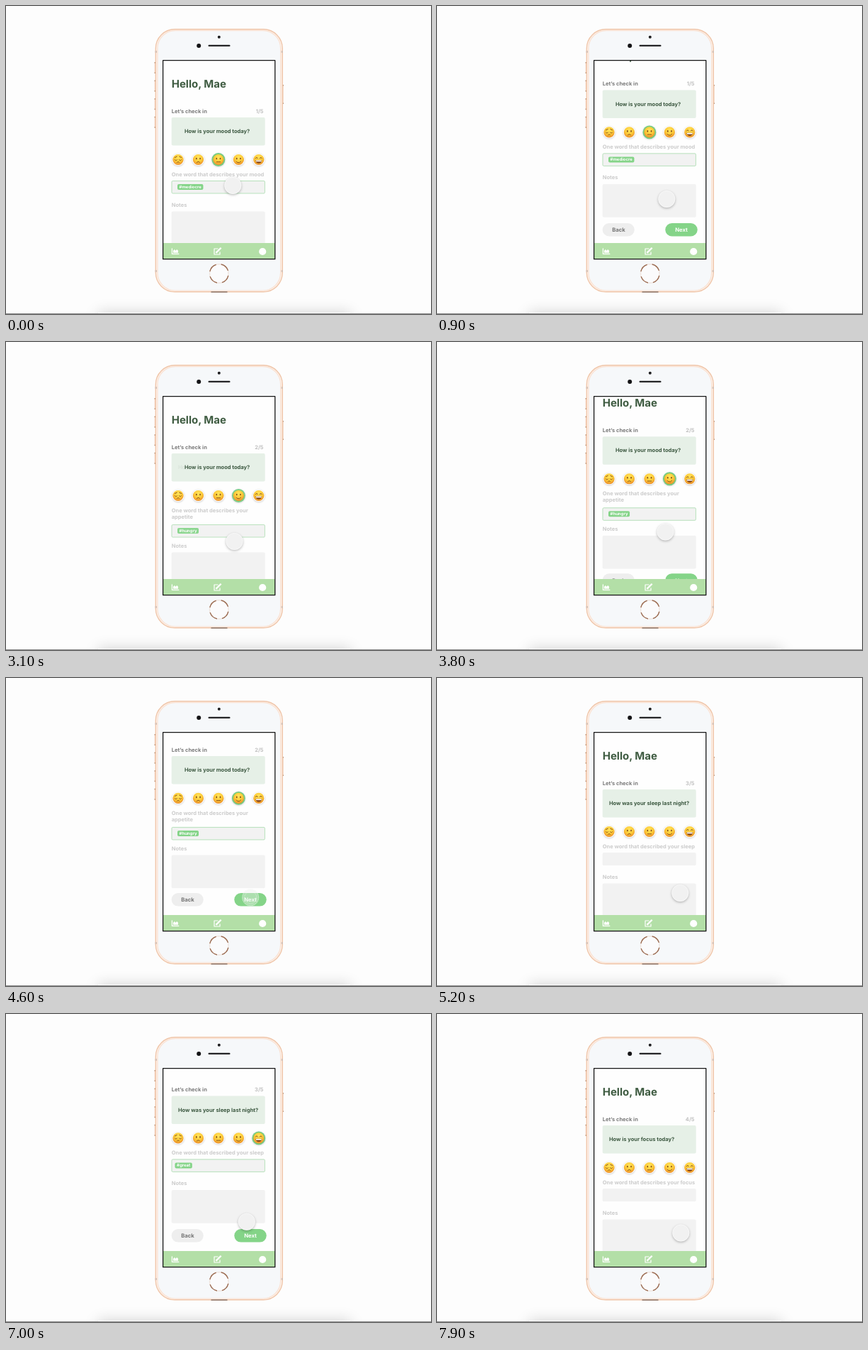
An HTML page with a canvas for the animation above (8000 ms loop, 600 by 434 pixels).

```html
<!DOCTYPE html>
<html lang="en">
<head>
<meta charset="utf-8">
<title>Mood check-in</title>
<style>
html, body { margin: 0; width: 100%; height: 100%; overflow: hidden; background: #fdfdfd; }
canvas { display: block; width: 600px; height: 434px; }
</style>
</head>
<body>
<canvas id="stage"></canvas>
<script>
const W = 600, H = 434, LOOP = 8000;
const FADE = 300, SCROLL = 360, MS_PER_PIXEL = 9;
const LEFT = 233.7, WIDTH = 132;
const FONT = 'Inter, Arial, sans-serif';
const GREEN = '#84d488', PANEL = '#f2f2f2', PALE = '#cccccc';
const dpr = window.devicePixelRatio || 1;

function makeLayer(canvas) {
  canvas.width = W * dpr;
  canvas.height = H * dpr;
  const ctx = canvas.getContext('2d');
  ctx.scale(dpr, dpr);
  ctx.textRendering = 'geometricPrecision';
  return ctx;
}
const main = makeLayer(document.getElementById('stage'));
const layer = makeLayer(document.createElement('canvas'));
const backdrop = makeLayer(document.createElement('canvas'));

const clamp = x => Math.max(0, Math.min(1, x));
const ease = x => clamp(x) ** 2 * (3 - 2 * clamp(x));

function box(c, x, y, w, h, r, fill, stroke, line = 1) {
  c.beginPath();
  c.roundRect(x, y, w, h, r);
  if (fill) { c.fillStyle = fill; c.fill(); }
  if (stroke) { c.strokeStyle = stroke; c.lineWidth = line; c.stroke(); }
}

function disc(c, x, y, r, fill) {
  c.beginPath();
  c.arc(x, y, r, 0, Math.PI * 2);
  c.fillStyle = fill;
  c.fill();
}

// Angles in half turns.
function arc(c, x, y, r, from, to) {
  c.beginPath();
  c.arc(x, y, r, from * Math.PI, to * Math.PI);
  c.stroke();
}

function line(c, ...points) {
  c.beginPath();
  points.forEach(([x, y]) => c.lineTo(x, y));
  c.stroke();
}

function shadow(c, color, blur, dy) {
  c.shadowColor = color;
  c.shadowBlur = blur * dpr;
  c.shadowOffsetY = dy * dpr;
}

// y is the middle of the capitals; returns the width.
function text(c, str, x, y, color, size = 7.5, align = 'left') {
  c.font = `700 ${size}px ${FONT}`;
  c.textAlign = align;
  c.fillStyle = color;
  c.fillText(str, x, y + size * 0.364);
  return c.measureText(str).width;
}

const mouths = [
  c => arc(c, 0, 5, 1.9, 1.2, 1.8),
  c => arc(c, 0, 5.6, 2.7, 1.2, 1.8),
  c => line(c, [-2.7, 3.2], [2.7, 3.2]),
  c => arc(c, 0, 0.4, 3.9, 0.18, 0.82),
  c => {
    c.beginPath();
    c.arc(0, 0.8, 4.5, 0, Math.PI);
    c.fillStyle = '#8a4a1c';
    c.fill();
    c.fillStyle = '#fff';
    c.fillRect(-3.9, 1, 7.8, 1.7);
  }
];

function emoji(c, x, y, mood, selected) {
  c.save();
  c.translate(x, y);
  shadow(c, 'rgba(0,0,0,.22)', 2.5, 0.6);
  disc(c, 0, 0, selected ? 9.4 : 8.6, selected ? '#74cd80' : '#fff');
  shadow(c, 'transparent', 0, 0);
  const skin = c.createRadialGradient(0, -3, 1, 0, -2, 10);
  skin.addColorStop(0, '#ffe158');
  skin.addColorStop(0.5, '#fccb38');
  skin.addColorStop(1, '#e8862a');
  disc(c, 0, 0, 7.6, skin);
  c.strokeStyle = c.fillStyle = '#80491a';
  c.lineWidth = 0.9;
  c.lineCap = 'round';
  for (const side of [-1, 1]) {
    if (mood === 0) {
      arc(c, side * 3, -0.6, 1.7, 0.15, 0.85);
      line(c, [side * 1.7, -4.4], [side * 4.6, -3]);
    } else if (mood === 4) {
      arc(c, side * 2.9, -1.3, 1.6, 1.1, 1.9);
    } else {
      c.beginPath();
      c.ellipse(side * 2.6, -1.5, 0.85, 1.3, 0, 0, Math.PI * 2);
      c.fill();
    }
  }
  mouths[mood](c);
  c.restore();
}

const mood = { ask: 'How is your mood today?', askX: 252 };
const appetite = { step: 2, label: ['One word that describes your', 'appetite'] };
const sleep = { step: 3, ask: 'How was your sleep last night?', label: ['One word that described your sleep'] };

// start: when the view begins to dissolve in; scroll: when it begins to scroll down.
const views = [
  { ...mood, step: 1, label: ['One word that describes your mood'], start: -FADE, pick: 2, tag: '#mediocre', scroll: 600 },
  { ...appetite, ask: 'How is your appetite today?', start: 1500 },
  { ...appetite, ...mood, start: 2850, pick: 3, tag: '#hungry', scroll: 3620 },
  { ...sleep, start: 4650 },
  { ...sleep, start: 5800, pick: 4, tag: '#great', tagX: 238.5, scroll: 6320 },
  { step: 4, ask: 'How is your focus today?', label: ['One word that describes your focus'], start: 7200 }
];
const pageTurns = views.filter(view => !view.tag).map(view => view.start);

function drawView(c, view, t) {
  const extra = view.label.length - 1;
  const inputY = 246 + extra * (view.tag ? 11 : 12);
  const notesY = 280 + extra * (view.tag ? 7 : 5.5);
  const areaY = notesY + 9.6;
  const buttonY = areaY + 55 - extra * 1.5;
  const scrolled = view.scroll ? ease((t - view.scroll) / SCROLL) * (buttonY - 303) : 0;

  c.save();
  c.beginPath();
  c.rect(222, 77, 158, 280);
  c.clip();
  c.fillStyle = '#fefefe';
  c.fillRect(222, 77, 158, 280);
  c.translate(0, -scrolled);

  text(c, 'Hello, Mae', LEFT, 109.3, '#3f5c42', 15);
  text(c, 'Let’s check in', LEFT, 148, '#7a7a7a');
  text(c, view.step + '/5', 363.5, 148, '#c0c0c0', 7.5, 'right');
  box(c, LEFT, 157, WIDTH, 39.5, 2, '#e6f0e7');
  text(c, view.ask, view.askX || 243, 176.5, '#3c5840');
  for (let i = 0; i < 5; i++) emoji(c, 243 + i * 28.45, 216.5, i, i === view.pick);
  view.label.forEach((row, i) => text(c, row, LEFT, 237 + i * 9, PALE));

  box(c, LEFT, inputY, WIDTH, 18.3, 2, PANEL);
  if (view.tag) {
    const x = view.tagX || 242;
    box(c, LEFT + 0.3, inputY + 0.5, WIDTH - 0.6, 17.5, 1.5, null, '#a8dcac', 0.8);
    c.font = `700 6px ${FONT}`;
    box(c, x, inputY + 5, c.measureText(view.tag).width + 5, 8, 2, GREEN);
    text(c, view.tag, x + 2.5, inputY + 8.8, '#fff', 6);
  }
  text(c, 'Notes', LEFT, notesY, PALE);
  box(c, LEFT, areaY, WIDTH, 46.7, 2, PANEL);

  box(c, LEFT, buttonY, 45, 18.6, 9.3, '#eeeeee');
  text(c, 'Back', 256.4, buttonY + 9.5, '#747474', 7.7, 'center');
  box(c, 322.3, buttonY, 45.4, 18.6, 9.3, GREEN);
  text(c, 'Next', 345, buttonY + 9.5, '#fff', 7.7, 'center');
  c.restore();
}

// [departure time, x, y]
const stops = [
  [0, 320.3, 253], [320, 324.3, 272], [950, 345.6, 312.5], [2150, 322.5, 281],
  [3660, 322.5, 267.5], [4030, 345.2, 309.3], [5090, 328.3, 252.5], [6660, 344.3, 308.5]
];

function cursorAt(t) {
  let [, x, y] = stops[0];
  for (const [depart, nextX, nextY] of stops) {
    const k = ease((t - depart) / (MS_PER_PIXEL * Math.hypot(nextX - x, nextY - y) || 1));
    x += (nextX - x) * k;
    y += (nextY - y) * k;
    if (k < 1) break;
  }
  return [x, y];
}

function drawCursor(c, t) {
  const [x, y] = cursorAt(t);
  const down = Math.max(...pageTurns.map(turn => clamp(1.6 - Math.abs(t - turn + 60) / 80)));
  c.save();
  c.globalAlpha = 1 - down;
  shadow(c, 'rgba(0,0,0,.27)', 3.5, 1.2);
  disc(c, x, y, 12, '#f1f1f1');
  shadow(c, 'transparent', 0, 0);
  c.strokeStyle = 'rgba(255,255,255,.6)';
  c.lineWidth = 0.8;
  arc(c, x, y, 11.6, 0, 2);
  c.globalAlpha = down;
  disc(c, x, y, 12, 'rgba(235,240,235,.4)');
  c.setLineDash([1.2, 1.2]);
  for (const r of [11.5, 8.5]) arc(c, x, y, r, 0, 2);
  c.restore();
}

function sideButton(c, x, y, h) {
  box(c, x, y, 1.6, h, 0.8, '#f3d6c3');
  c.fillStyle = '#a98368';
  for (const end of [y, y + h - 1.5]) c.fillRect(x, end, 1.6, 1.5);
}

function drawBackdrop(c) {
  c.fillStyle = '#fdfdfd';
  c.fillRect(0, 0, W, H);
  c.save();
  shadow(c, 'rgba(0,0,0,.18)', 20, 0);
  c.fillRect(130, 432, 356, 20);
  c.restore();
  c.fillStyle = '#8c8c8c';
  c.fillRect(0, 433, W, 1);

  for (let i = 0; i < 4; i++) sideButton(c, 209.6, 79 + i * 25.6, 16);
  sideButton(c, 390.2, 111, 27);

  // body
  box(c, 211.3, 32.8, 179, 370, 27, '#fcf0e8', '#f0c6aa', 1.4);
  box(c, 214, 34.6, 173.6, 366.4, 25, '#f6f8fa', '#fae2d3', 1.2);
  c.fillStyle = '#d9c4b7';
  for (const x of [210.6, 388.6]) {
    for (const y of [63, 372]) c.fillRect(x, y, 2.4, 3);
  }
  c.fillStyle = '#8a7468';
  c.fillRect(289.5, 402.2, 23, 1.5);

  // camera and speaker
  disc(c, 300.8, 43.8, 2, '#1d1d1f');
  disc(c, 272.2, 56, 3, '#141416');
  box(c, 285.5, 54.8, 31, 2.2, 1.1, '#242426');

  // home button
  disc(c, 300.8, 377, 13.6, '#fbfbfc');
  c.lineWidth = 1.4;
  c.strokeStyle = '#f0e6e0';
  arc(c, 300.8, 377, 13.3, 0, 2);
  c.strokeStyle = '#9a6a50';
  for (let i = 0; i < 4; i++) arc(c, 300.8, 377, 13.3, i / 2 - 0.43, i / 2 - 0.1);
}

function drawNav(c) {
  c.fillStyle = '#b3dfa7';
  c.fillRect(222, 334, 158, 23);
  c.fillStyle = c.strokeStyle = '#fff';
  c.lineWidth = 1.2;
  c.lineCap = c.lineJoin = 'round';
  // area chart
  line(c, [234.4, 341.8], [234.4, 349.4], [243.8, 349.4]);
  c.beginPath();
  c.moveTo(236, 347.8);
  for (let i = 0; i < 5; i++) c.lineTo(236 + i * 1.75, 344.8 - (i % 2) * 1.8);
  c.lineTo(243, 347.8);
  c.fill();
  // compose
  line(c, [299, 342], [294, 342], [294, 350], [302, 350], [302, 346.8]);
  c.lineWidth = 2.3;
  c.lineCap = 'butt';
  line(c, [296.4, 347.9], [303.6, 340.7]);
  disc(c, 362.2, 346, 5.1, '#fff');
}

function draw(t) {
  main.drawImage(backdrop.canvas, 0, 0, W, H);
  const current = views.findLastIndex(view => t >= view.start + FADE);
  drawView(main, views[current], t);
  const next = views[current + 1];
  if (next && t > next.start) {
    drawView(layer, next, t);
    main.save();
    main.beginPath();
    main.rect(222, 77, 158, 280);
    main.clip();
    main.globalAlpha = ease((t - next.start) / FADE);
    main.drawImage(layer.canvas, 0, 0, W, H);
    main.restore();
  }
  drawNav(main);
  box(main, 221.6, 76.7, 158.2, 280, 0, null, '#161616', 1.3);
  drawCursor(main, t);
}

drawBackdrop(backdrop);
const start = performance.now();
function tick() {
  draw((performance.now() - start) % LOOP);
  requestAnimationFrame(tick);
}
tick();
</script>
</body>
</html>
```
